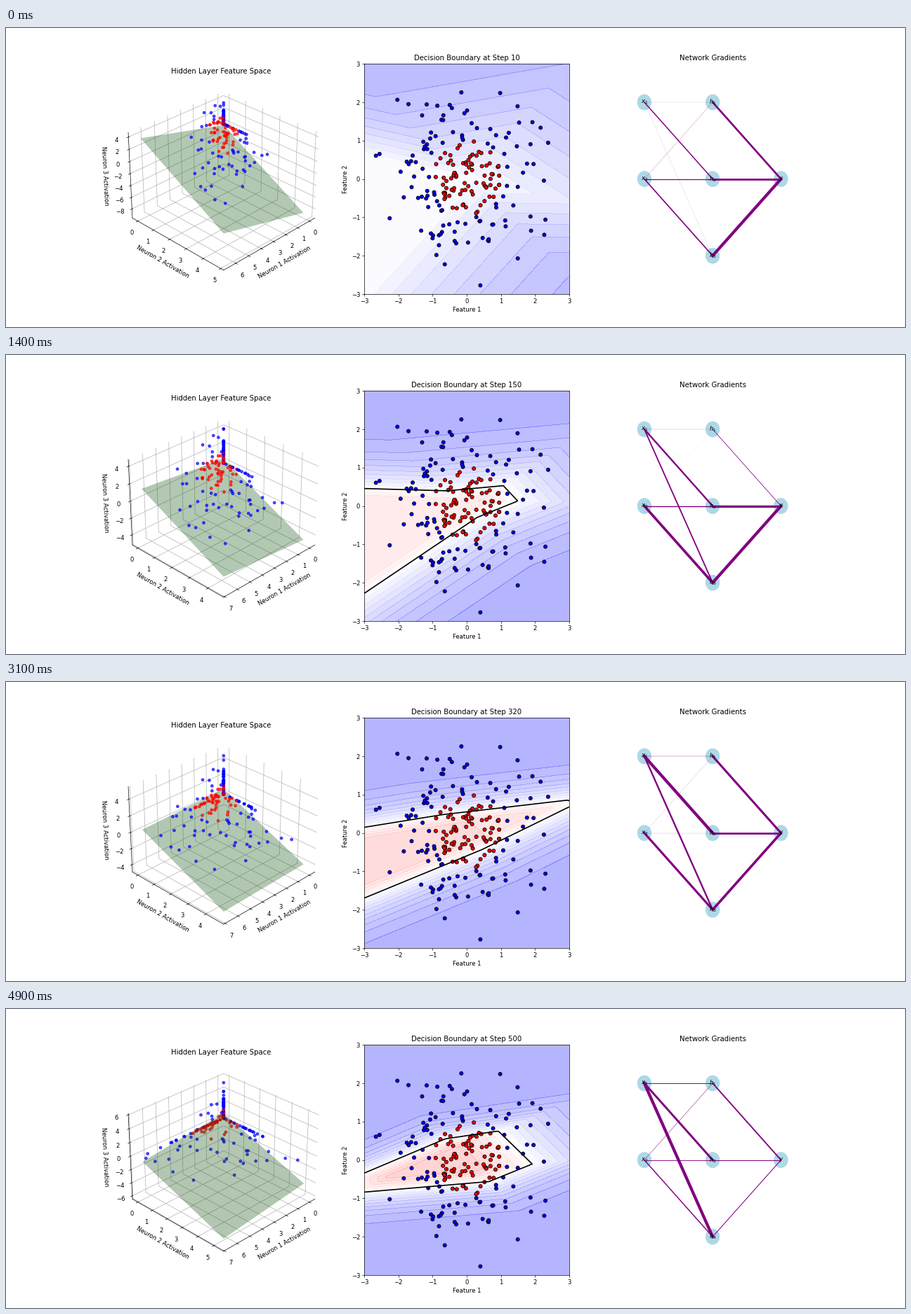
A matplotlib script for the animation above (5000 ms loop, 1280 by 427 pixels).

```python
import numpy as np
import matplotlib.pyplot as plt
from matplotlib.animation import FuncAnimation
from matplotlib.patches import Circle

W, H = 1280, 427
DPI = W / 21
FRAMES, STEPS, RATE = 50, 10, 0.1
WARMUP = 20


def make_data(n=200):
    rng = np.random.RandomState(0)
    pts = rng.randn(n, 2)
    inside = (pts ** 2).sum(axis=1) < 1
    return pts, inside.astype(float)[:, None]


def forward(pts, net):
    w1, b1, w2, b2 = net
    hid = np.maximum(pts @ w1 + b1, 0)
    return hid, 1 / (1 + np.exp(-(hid @ w2 + b2)))


def train(pts, lab):
    """Gradient descent on cross entropy; one snapshot per frame."""
    rng = np.random.RandomState(0)
    net = [rng.randn(2, 3), np.zeros(3), rng.randn(3, 1), np.zeros(1)]
    shots = []
    for step in range(1, WARMUP + FRAMES * STEPS + 1):
        hid, out = forward(pts, net)
        d2 = (out - lab) / len(pts)
        d1 = (d2 @ net[2].T) * (hid > 0)
        grads = [pts.T @ d1, d1.sum(axis=0), hid.T @ d2, d2.sum(axis=0)]
        net = [p - RATE * g for p, g in zip(net, grads)]
        if step > WARMUP and step % STEPS == 0:
            shots.append((net, hid, grads))
    return shots


X, Y = make_data()
SHOTS = train(X, Y)
COLORS = np.where(Y.ravel() > 0, "red", "blue")
SIDE = np.linspace(-3, 3, 200)
GX, GY = np.meshgrid(SIDE, SIDE)
GRID = np.column_stack([GX.ravel(), GY.ravel()])
LEVELS = np.linspace(0, 1, 21)

INPUTS = [(0, 1), (0, 0.5)]
HIDDEN = [(0.5, 1), (0.5, 0.5), (0.5, 0)]
OUTPUT = [(1, 0.5)]

fig = plt.figure(figsize=(W / DPI + 1e-9, H / DPI + 1e-9), dpi=DPI)
ax_hid = fig.add_subplot(131, projection="3d")
ax_in = fig.add_subplot(132)
ax_net = fig.add_subplot(133)


def draw_hidden(net, hid):
    ax = ax_hid
    ax.clear()
    for axis in (ax.xaxis, ax.yaxis, ax.zaxis):
        axis.set_pane_color("white")
    ax.scatter(*hid.T, c=COLORS, alpha=0.7)
    w2, b2 = net[2].ravel(), net[3][0]
    px, py = np.meshgrid([0, hid[:, 0].max()], [0, hid[:, 1].max()])
    pz = -(w2[0] * px + w2[1] * py + b2) / w2[2]
    ax.plot_surface(px, py, pz, color="green", alpha=0.3)
    ax.view_init(elev=30, azim=45)
    ax.set_title("Hidden Layer Feature Space")
    ax.set_xlabel("Neuron 1 Activation")
    ax.set_ylabel("Neuron 2 Activation")
    ax.set_zlabel("Neuron 3 Activation")


def draw_boundary(net, step):
    ax = ax_in
    ax.clear()
    prob = forward(GRID, net)[1].reshape(GX.shape)
    ax.contourf(GX, GY, prob, levels=LEVELS, cmap="bwr", alpha=0.3)
    if prob.min() < 0.5 < prob.max():
        ax.contour(GX, GY, prob, levels=[0.5], colors="black", linewidths=2)
    ax.scatter(*X.T, c=COLORS, edgecolors="black")
    ax.set(xlim=(-3, 3), ylim=(-3, 3), xlabel="Feature 1", ylabel="Feature 2",
           title=f"Decision Boundary at Step {step}")


def draw_edges(starts, ends, widths):
    for a, row in zip(starts, widths):
        for b, width in zip(ends, row):
            ax_net.plot([a[0], b[0]], [a[1], b[1]], color="purple", lw=width)


def draw_network(grads):
    ax = ax_net
    ax.clear()
    ax.axis("off")
    g1, g2 = np.abs(grads[0]), np.abs(grads[2])
    scale = 5 / max(g1.max(), g2.max())
    draw_edges(INPUTS, HIDDEN, g1 * scale)
    draw_edges(HIDDEN, OUTPUT, g2 * scale)
    names = ["$x_1$", "$x_2$", "$h_1$", "$h_2$", "$h_3$", "$y$"]
    for spot, name in zip(INPUTS + HIDDEN + OUTPUT, names):
        ax.add_patch(Circle(spot, 0.05, color="lightblue"))
        ax.text(*spot, name, ha="center", va="center")
    ax.set(xlim=(-0.25, 1.25), ylim=(-0.25, 1.25), title="Network Gradients")


def update(i):
    net, hid, grads = SHOTS[i]
    draw_hidden(net, hid)
    draw_boundary(net, (i + 1) * STEPS)
    draw_network(grads)
    return []


anim = FuncAnimation(fig, update, frames=FRAMES, interval=100,
                     init_func=lambda: [], repeat=True, repeat_delay=0)
plt.show()
```
